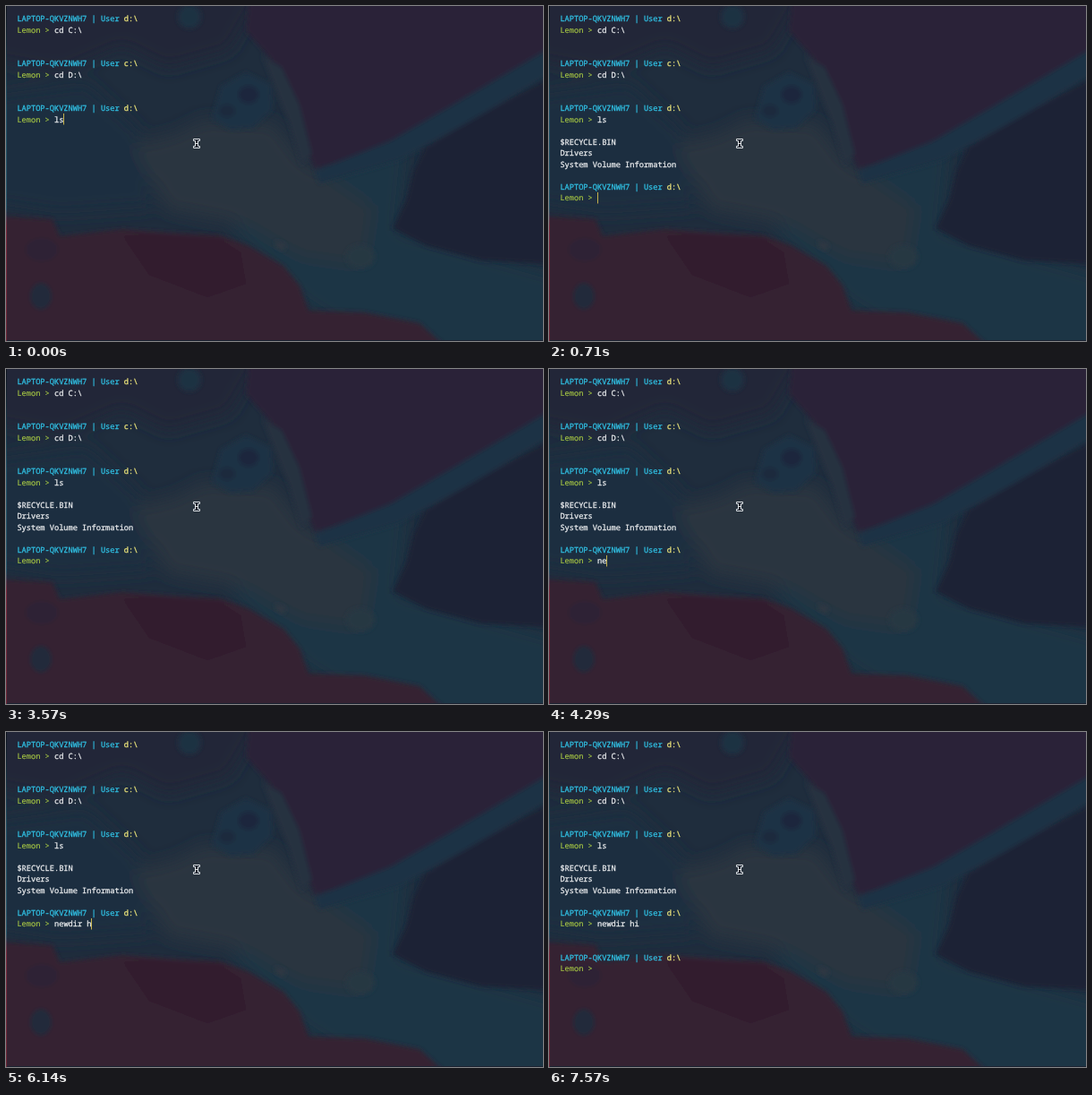
An HTML page for the animation above (8 s loop, 600 px wide and 374 px high).

```html
<!DOCTYPE html>
<html lang="en">
<head>
<meta charset="utf-8">
<title>Terminal session</title>
<style>
  html, body { margin: 0; height: 100%; overflow: hidden; background: #1e283a; }
  svg { display: block; width: 600px; height: 374px; }
  text {
    font: 8.67px "Noto Sans Mono", "DejaVu Sans Mono", monospace;
    white-space: pre;
    text-rendering: geometricPrecision;
    stroke-width: .3px;
  }
  .host { fill: #30bfe2; stroke: #30bfe2; }
  .path { fill: #f0e87c; stroke: #f0e87c; }
  .name { fill: #a8c944; stroke: #a8c944; stroke-width: .15px; }
  .out { fill: #e8eaec; stroke: #e8eaec; }
</style>
</head>
<body>
<svg viewBox="0 0 600 374">
  <defs>
    <filter id="soft" x="-10%" y="-10%" width="120%" height="120%"><feGaussianBlur stdDeviation="2.5"/></filter>
    <filter id="haze" x="-30%" y="-30%" width="160%" height="160%"><feGaussianBlur stdDeviation="9"/></filter>
    <linearGradient id="edge" x2="0" y2="1">
      <stop offset="0" stop-color="#0c121c"/>
      <stop offset=".3" stop-color="#1f5064"/>
      <stop offset=".6" stop-color="#2a5a6c"/>
      <stop offset=".66" stop-color="#7c2c40"/>
      <stop offset="1" stop-color="#6e2838"/>
    </linearGradient>
  </defs>

  <!-- dim painted wallpaper -->
  <rect width="600" height="374" fill="#1f2d3d"/>
  <g filter="url(#haze)">
    <path fill="#222539" d="M-20-20H290L250 50 180 70 130 45 60 75-20 60Z"/>
    <path fill="#1c2f41" d="M-20 100 90 85 150 140 165 225 60 232-20 220Z"/>
    <path fill="#1c3445" d="M330 190 450 150 440 250 620 300V400H440L330 330 250 250Z"/>
    <path fill="#293641" d="M140 155 190 142 220 126 300 130 330 170 410 225 400 290 330 280 270 245 180 228Z"/>
  </g>
  <g filter="url(#soft)">
    <circle cx="205" cy="12" r="13" fill="#1f3243"/>
    <path fill="#292137" d="M272-9H610V52L520 98 440 146 390 168 345 182 332 150 322 105 298 62 268 28Z"/>
    <path fill="#273040" d="M286 55 308 68 328 110 342 165 330 178 316 130Z"/>
    <path fill="#1c3244" d="M610 45 520 98 430 150 345 184 350 198 440 172 520 128 610 75Z"/>
    <path fill="#1a2136" d="M610 78 530 122 468 158 455 185 448 215 432 248 470 268 530 284 610 288Z"/>
    <path fill="#342030" d="M-9 234 52 238 60 257 130 249 200 254 240 256 272 268 310 290 328 312 338 340 400 342 462 354 495 384H-9Z"/>
    <path fill="#331c2e" d="M130 256 235 258 262 275 268 310 225 325 160 300Z"/>
    <path fill="#1d3244" d="M230 126 240 90 268 74 296 88 298 116 276 136 250 138Z"/>
    <ellipse cx="271" cy="99" rx="11" ry="10" fill="#1c283c"/>
    <ellipse cx="247" cy="117" rx="9" ry="7" fill="#1d2b3e"/>
    <ellipse cx="396" cy="280" rx="16" ry="13" fill="#263743"/>
    <ellipse cx="40" cy="272" rx="18" ry="13" fill="#2d2235"/>
    <ellipse cx="39" cy="324" rx="12" ry="15" fill="#24293a"/>
    <path fill="#303943" d="M300 262 312 266 311 273 303 270Z"/>
  </g>
  <path fill="#1b2231" d="M0 373H600V374H0Z"/>
  <path fill="url(#edge)" d="M0 0H1V374H0Z"/>

  <g id="screen"></g>
  <text id="typed" class="out"></text>
  <rect id="caret" width="1" height="12.5" fill="#c6b24c"/>

  <!-- text pointer -->
  <g fill="#18212f" stroke="#dfe3e6">
    <path d="M209.5 148.5H216.5V150.5H214.5V156.5H216.5V158.5H209.5V156.5H211.5V150.5H209.5Z"/>
    <path d="M211 153.5H215"/>
  </g>
</svg>
<script>
const LOOP = 8000, LEFT = 12.4, PITCH = 5.2, ROW = 12.5;
const HOST = 'LAPTOP-QKVZNWH7';
const el = id => document.getElementById(id);
const rowY = row => 17.1 + row * ROW;
const span = (cls, text) => `<tspan class="${cls}">${text}</tspan>`;
const line = (row, html) => `<text x="${LEFT}" y="${rowY(row)}">${html}</text>`;
const prompt = (row, drive, cmd = '') =>
  line(row, span('host', HOST + ' | User ') + span('path', drive + ':\\')) +
  line(row + 1, span('name', 'Lemon &gt; ') + span('out', cmd));

// start time, markup that appears then
const blocks = [
  [0, prompt(0, 'd', 'cd C:\\') + prompt(4, 'c', 'cd D:\\') + prompt(8, 'd', 'ls')],
  [710, ['$RECYCLE.BIN', 'Drivers', 'System Volume Information']
    .map((s, i) => line(11 + i, span('out', s))).join('') + prompt(15, 'd')],
  [6860, prompt(19, 'd')]
];
el('screen').innerHTML = blocks.map(([, html]) => `<g>${html}</g>`).join('');
const groups = [...el('screen').children];

// start time, row, text typed so far, caret visible
const steps = [
  [0, 9, 'ls', 1], [430, 9, 'ls', 0],
  [710, 16, '', 1], [1140, 16, '', 0], [1710, 16, '', 1],
  [2430, 16, '', 0], [3000, 16, '', 1], [3570, 16, '', 0],
  [4000, 16, 'n', 1], [4290, 16, 'ne', 1], [4570, 16, 'new', 1],
  [4860, 16, 'newd', 1], [5000, 16, 'newdi', 1], [5290, 16, 'newdir', 1],
  [5710, 16, 'newdir', 0], [5860, 16, 'newdir ', 1],
  [6140, 16, 'newdir h', 1], [6430, 16, 'newdir hi', 1],
  [6860, 20, '', 1], [7570, 20, '', 0]
];

const place = (node, x, y) => { node.setAttribute('x', x); node.setAttribute('y', y); };

function draw(now) {
  const t = now % LOOP;
  groups.forEach((g, i) => g.style.display = t < blocks[i][0] ? 'none' : '');
  const [, row, text, on] = steps.findLast(s => s[0] <= t);
  const x = LEFT + 8 * PITCH;
  // the finished command stays on its row after Enter
  const done = row === 20;
  el('typed').textContent = done ? 'newdir hi' : row === 16 ? text : '';
  place(el('typed'), x, rowY(16));
  place(el('caret'), Math.floor(x + text.length * PITCH), Math.round(rowY(row) - 9.3));
  el('caret').style.display = on ? '' : 'none';
}

const start = performance.now();
function tick() {
  draw(performance.now() - start);
  requestAnimationFrame(tick);
}
tick();
</script>
</body>
</html>
```
